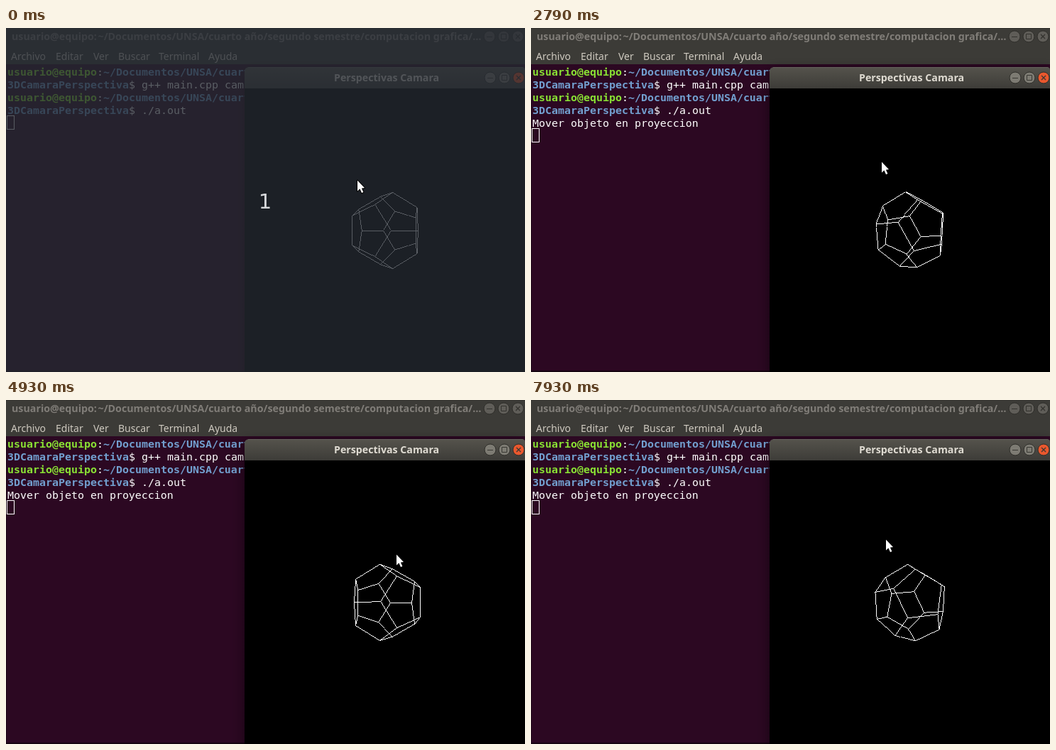
Recreate the animation shown at these times as an HTML page with a canvas. Size 731x484 px, loop 8 s.

```html
<!DOCTYPE html>
<html lang="es">
<head>
<meta charset="utf-8">
<title>Perspectivas Camara</title>
<style>
html, body { margin: 0; width: 100%; height: 100%; overflow: hidden; background: #000; }
canvas { display: block; }
</style>
</head>
<body>
<canvas id="stage" width="731" height="484"></canvas>
<script>
const ctx = document.getElementById('stage').getContext('2d');
const LOOP = 8000;
const RATE = 14 / 1000;
const UI = '"Noto Sans", "Open Sans", sans-serif';
const MONO = '"DejaVu Sans Mono", "Noto Sans Mono", monospace';
const GREEN = '#8ae234', BLUE = '#729fcf', WHITE = '#ffffff';

// step, pointer x, pointer y, yaw, pitch (degrees)
const KEYS = [
  [30, 495, 214, 5.5, 0],
  [31, 495, 214, 3.7, 0],
  [42, 494, 178, 3, -36],
  [47, 467, 229, 34.5, 15],
  [51, 467, 229, 34.5, 15],
  [62, 515, 189, -18, -24],
  [63, 515, 189, -18, -24],
  [69, 550, 217, -49, 1],
  [73, 550, 217, -49, 1],
  [85, 484, 190, 18, -22.5],
  [87, 479, 194, 25, -18.5],
  [95, 459, 236, 43, 22],
  [97, 459, 236, 43, 22],
  [98, 459, 237, 43, 23],
  [99, 459, 237, 43, 23],
  [111, 500, 196, -4.8, -19.5]
];

// Dodecahedron with a three-fold axis along z
const vertices = [];
function addPair(radius, degrees, z) {
  const a = degrees * Math.PI / 180;
  const x = radius * Math.cos(a), y = radius * Math.sin(a);
  vertices.push([x, y, z], [-x, -y, -z]);
}
addPair(0, 0, Math.sqrt(3));
for (const a of [0, 120, 240]) {
  addPair(2 / Math.sqrt(3), a, Math.sqrt(5 / 3));
  addPair(Math.sqrt(8 / 3), a + 37.76, 1 / Math.sqrt(3));
  addPair(Math.sqrt(8 / 3), a - 37.76, 1 / Math.sqrt(3));
}
const edges = [];
vertices.forEach((p, i) => vertices.forEach((q, j) => {
  if (i < j && Math.hypot(p[0] - q[0], p[1] - q[1], p[2] - q[2]) < 1.3) edges.push([i, j]);
}));

function poseAt(step) {
  if (step <= KEYS[0][0]) return KEYS[0].slice(1);
  const next = KEYS.findIndex(k => k[0] >= step);
  if (next < 0) return KEYS[KEYS.length - 1].slice(1);
  const a = KEYS[next - 1], b = KEYS[next];
  const u = (step - a[0]) / (b[0] - a[0]);
  return a.map((v, i) => v + (b[i] - v) * u).slice(1);
}

function text(str, x, y, font, color) {
  ctx.font = font;
  ctx.fillStyle = color;
  ctx.fillText(str, x, y);
}

function rect(x, y, w, h, fill) {
  ctx.fillStyle = fill;
  ctx.fillRect(x, y, w, h);
}

function gradient(y0, y1, from, to) {
  const g = ctx.createLinearGradient(0, y0, 0, y1);
  g.addColorStop(0, from);
  g.addColorStop(1, to);
  return g;
}

function buttons(x, y, fill, closeFill, ink) {
  [fill, fill, closeFill].forEach((color, i) => {
    const cx = x + i * 20;
    ctx.beginPath();
    ctx.arc(cx, y, 8, 0, 7);
    ctx.fillStyle = color;
    ctx.fill();
    ctx.lineWidth = 1;
    ctx.strokeStyle = '#2f2e2a';
    ctx.stroke();
    ctx.strokeStyle = ink;
    ctx.beginPath();
    if (i === 0) {
      ctx.moveTo(cx - 4, y + .5);
      ctx.lineTo(cx + 4, y + .5);
    } else if (i === 1) {
      ctx.rect(cx - 3.5, y - 3.5, 7, 7);
    } else {
      ctx.lineWidth = 1.3;
      ctx.moveTo(cx - 3, y - 3);
      ctx.lineTo(cx + 3, y + 3);
      ctx.moveTo(cx + 3, y - 3);
      ctx.lineTo(cx - 3, y + 3);
    }
    ctx.stroke();
  });
}

// Each run starts on a 9 px character grid
function terminalRun(str, column, row, color, bold) {
  text(str, 2 + column * 9, 67 + row * 18, (bold ? 'bold ' : '') + '14.95px ' + MONO, color);
}

function drawTerminal(printed) {
  rect(0, 0, 731, 484, '#2c0822');
  rect(0, 0, 731, 51, '#3c3b37');
  rect(0, 0, 731, 1, '#33322f');
  rect(0, 51, 1, 433, '#1c0718');
  rect(0, 482, 731, 2, '#160411');
  const titleFont = 'bold 14.25px ' + UI;
  text('usuario@equipo:', 8, 17, titleFont, '#807d78');
  text('~/Documentos/UNSA/cuarto año/segundo semestre/computacion grafica/…', 129.5, 17, titleFont, '#807d78');
  buttons(681, 12, '#5f5d58', '#5f5d58', '#33322e');
  const menu = [['Archivo', 7], ['Editar', 70], ['Ver', 123], ['Buscar', 158], ['Terminal', 215], ['Ayuda', 285]];
  for (const [label, x] of menu) text(label, x, 45, '14px ' + UI, '#cfcac0');

  for (const row of [0, 2]) {
    terminalRun('usuario@equipo', 0, row, GREEN, true);
    terminalRun(':', 14, row, WHITE);
    terminalRun('~/Documentos/UNSA/cuarto', 15, row, BLUE, true);
    terminalRun('3DCamaraPerspectiva', 0, row + 1, BLUE, true);
    terminalRun('$', 19, row + 1, WHITE);
  }
  terminalRun('g++ main.cpp camara', 21, 1, WHITE);
  terminalRun('./a.out', 21, 3, WHITE);
  if (printed) terminalRun('Mover objeto en proyeccion', 0, 4, WHITE);
  ctx.strokeStyle = WHITE;
  ctx.lineWidth = 1;
  ctx.strokeRect(1.5, printed ? 141.5 : 123.5, 10, 19);
}

function drawWindow() {
  ctx.beginPath();
  ctx.roundRect(336, 55, 395, 440, [6, 4, 0, 0]);
  ctx.save();
  ctx.shadowColor = 'rgba(0,0,0,.5)';
  ctx.shadowBlur = 18;
  ctx.shadowOffsetY = 4;
  ctx.fillStyle = gradient(55, 85, '#55534c', '#3d3c38');
  ctx.fill();
  ctx.restore();
  rect(341, 55, 387, 1, '#65635b');
  rect(336, 85, 395, 399, '#000');
  text('Perspectivas Camara', 462, 75, 'bold 14.2px ' + UI, '#dfdbd2');
  buttons(682, 70, '#7d7b73', '#e9582e', '#393833');
}

function project([x, y, z], yaw, pitch) {
  const px = x * Math.cos(yaw) + z * Math.sin(yaw);
  const pz = z * Math.cos(yaw) - x * Math.sin(yaw);
  const py = y * Math.cos(pitch) + pz * Math.sin(pitch);
  const depth = pz * Math.cos(pitch) - y * Math.sin(pitch);
  const scale = 31.2 / (1 - depth / 9.3);
  return [535.9 + px * scale * .98, 285 - py * scale];
}

// Hard one-pixel line
function pixelLine([x0, y0], [x1, y1]) {
  const n = Math.max(1, Math.round(Math.max(Math.abs(x1 - x0), Math.abs(y1 - y0))));
  for (let i = 0; i <= n; i++) {
    ctx.fillRect(Math.floor(x0 + (x1 - x0) * i / n), Math.floor(y0 + (y1 - y0) * i / n), 1, 1);
  }
}

function drawSolid(yaw, pitch) {
  const rad = Math.PI / 180;
  const points = vertices.map(v => project(v, yaw * rad, pitch * rad));
  ctx.fillStyle = WHITE;
  for (const [i, j] of edges) pixelLine(points[i], points[j]);
}

function drawPointer(x, y) {
  ctx.save();
  ctx.translate(Math.round(x), Math.round(y) + .5);
  ctx.beginPath();
  [[0, 0], [0, 15], [3.4, 11.8], [6, 17.6], [8.4, 16.5], [5.9, 11], [10, 10.6]]
    .forEach(([px, py]) => ctx.lineTo(px, py));
  ctx.closePath();
  ctx.lineJoin = 'round';
  ctx.lineWidth = 2;
  ctx.strokeStyle = '#000';
  ctx.stroke();
  ctx.fillStyle = WHITE;
  ctx.fill();
  ctx.restore();
}

function drawCountdown() {
  rect(0, 0, 731, 484, 'rgba(38,43,51,.76)');
  ctx.textAlign = 'center';
  text('1', 365, 254, '29px "DejaVu Sans", sans-serif', '#d5d7da');
  ctx.textAlign = 'left';
}

function render(now) {
  const ms = now % LOOP;
  const [x, y, yaw, pitch] = poseAt(Math.floor(ms * RATE + .1));
  drawTerminal(ms >= 1000);
  drawWindow();
  drawSolid(yaw, pitch);
  if (ms < 500) drawCountdown();
  drawPointer(x, y);
}

const start = performance.now();
function tick() {
  render(performance.now() - start);
  requestAnimationFrame(tick);
}
tick();
</script>
</body>
</html>
```
